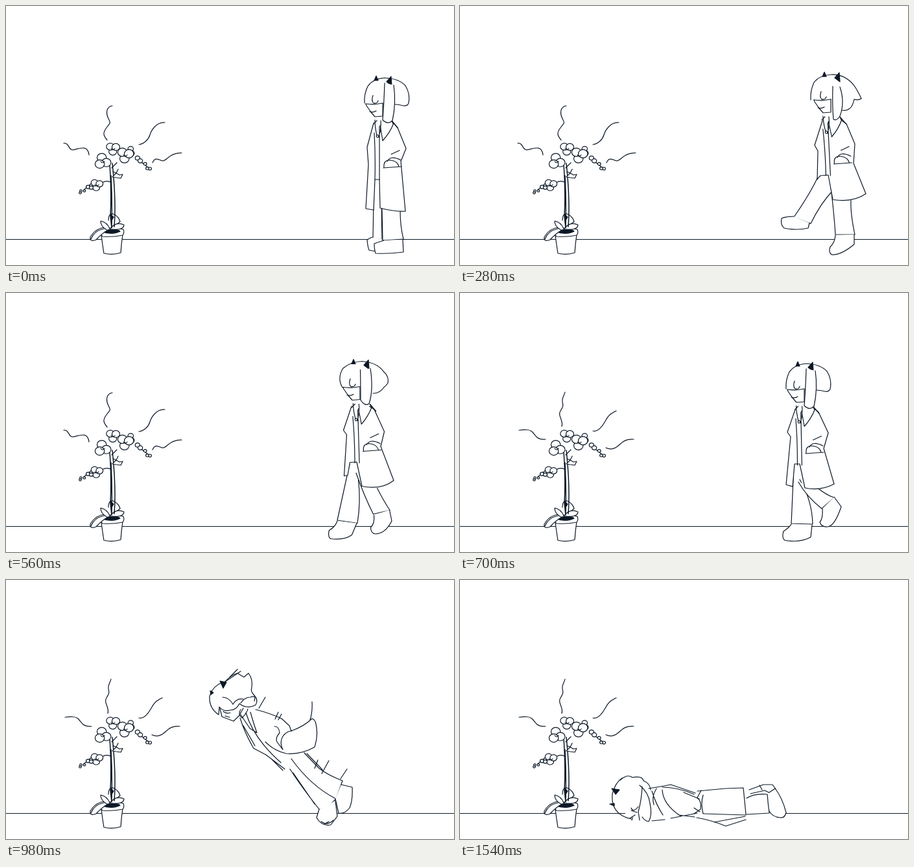
Write an HTML page that moves like this. It is 691 px wide and 400 px high and loops after 1610 ms.

```html
<!DOCTYPE html>
<html lang="en">
<head>
<meta charset="utf-8">
<title>Orchid</title>
<style>
  html, body { margin: 0; width: 100%; height: 100%; overflow: hidden; background: #fff; }
  svg { display: block; width: 691px; height: 400px; }
  path, circle { fill: #fff; stroke: #0c1826; stroke-width: 1.2; stroke-linecap: round; stroke-linejoin: round; }
  .line { fill: none; }
  .ink { fill: #0c1826; }
  .mask { stroke: none; }
</style>
</head>
<body>
<svg viewBox="0 0 691 400">
  <path d="M0 360.5H691" style="stroke-width:1"/>

  <g id="plant">
    <path d="M147 354Q149 370 151 382Q165 385 177 381Q178 366 180 353"/>
    <path d="M145 347Q146 354 149 356Q166 357 180 354Q183 350 181 345Q163 340 145 347"/>
    <path class="ink" d="M149 349Q154 345 164 345Q174 345 176 348Q164 354 149 349"/>
    <path d="M158 331Q158 320 165 321Q174 325 176 333L165 342"/>
    <path d="M153 342Q138 343 130 357Q129 365 139 361Q147 352 157 346"/>
    <path d="M131 360Q136 347 151 344" class="line"/>
    <path d="M160 344Q156 334 146 332Q146 341 156 346"/>
    <path d="M160 345Q169 332 182 338Q182 344 172 345Z"/>
    <path class="line" d="M160 246Q163 285 161 325L163 343M162 262Q164 300 163 342M164 243Q170 300 167 341" style="stroke-width:1.5"/>
    <path class="ink" d="M161 322L166 326L163 331Z"/>
    <path d="M164 264L170 258L175 261L180 260L177 266L170 265Z"/>
    <path class="line" d="M165 256L170 258L173 252M161 272Q155 269 148 273M163 250L170 243M167 246L171 242M120 284L133 273M205 238L220 250"/>
    <g id="blooms"></g>
  </g>

  <g id="scent"></g>

  <g id="walk">
    <g id="legs"></g>
    <g id="upper">
      <path id="coat"/>
      <g id="trim">
        <path class="line" d="M576 186L576 268M568 196Q570 230 569 268M569 176Q569 187 572 200M578 177Q579 190 575 203"/>
        <path class="line" d="M598 181Q592 196 581 208L577 184M567 182L572 177M597 182L595 177L604 188"/>
        <circle cx="573" cy="201" r="1.8"/>
        <path class="line" d="M594 229L607 223M582 250L610 248M583 249Q582 238 592 238Q604 239 606 248M588 240Q593 230 609 238"/>
      </g>
      <g id="head">
        <path id="hair"/>
        <g id="face">
          <path d="M555 151L556 154L563 164L569 171L581 170V150"/>
          <path class="line" d="M555 151Q568 153 581 150M566 138Q563 147 567 150Q573 151 574 146M561 163Q566 165 571 162"/>
          <path class="ink" d="M568 115L571 108L574 115ZM587 117L594 109L595 123Z"/>
        </g>
        <path id="lock"/>
      </g>
    </g>
  </g>

  <g id="fall">
    <path class="mask" d="M438 290L483 354L509 338L519 310L460 267Z"/>
    <path class="line" d="M438 292Q456 320 483 354Q497 352 509 338L519 310Q498 302 483 291L460 267M440 276Q470 318 509 338M443 298L476 346M464 268L488 293"/>
    <path d="M517 316L534 320Q535 340 530 352Q522 362 513 360L508 338"/>
    <path d="M483 354L479 367Q487 381 501 378L511 365L508 341"/>
    <path class="line" d="M486 373Q495 380 505 371M491 377L498 373"/>
    <path d="M385 200Q408 206 425 214L437 225L440 233Q460 226 472 214Q477 216 478 222Q482 240 476 258Q455 270 432 268Q414 264 400 250"/>
    <path class="line" d="M361 213Q368 236 382 260L401 270L430 292M366 225L384 256M370 205Q382 245 424 282M377 204Q382 222 387 236L376 229L362 208M414 226Q421 226 422 236Q415 244 418 250L427 262M427 262Q421 250 428 240Q434 233 441 233M410 277L427 294"/>
    <path d="M329 194L333 211L351 218L360 209L366 198"/>
    <path d="M328 208Q313 198 314 180Q319 162 338 157Q348 146 357 144L367 150L374 144Q381 153 379 166Q377 172 382 177Q390 185 385 193Q372 200 360 191Q355 201 346 201Q335 204 329 196Z"/>
    <path class="line" d="M334 181Q344 181 350 192Q356 182 366 184M362 190Q368 181 377 181Q386 177 383 187M338 210L345 212M335 203Q340 207 346 205M362 200Q357 207 364 213Q372 205 373 199"/>
    <path class="ink" d="M330 156L340 158L335 167ZM315 171L320 174L316 177Z"/>
    <path class="line" d="M345 150L357 138M338 157L362 141M390 198L400 181M415 215L420 204M420 216L425 207M472 188Q473 203 469 216M476 291L481 278M487 299L498 279M516 307L526 292"/>
  </g>

  <g id="lie">
    <path class="mask" d="M234 335L262 303L320 318L366 325L438 321L486 321L503 360L490 367L441 370L410 379L365 368L262 369Z"/>
    <path class="line" d="M250 306Q240 312 235 330Q232 362 264 369M247 309Q258 299 266 305Q281 302 283 310Q293 314 294 324"/>
    <path class="line" d="M281 319Q280 340 275 358L277 371M277 317Q291 328 293 345Q297 363 291 373Q286 373 281 366M264 352Q267 360 275 350M264 356L273 359M262 368L270 363M265 371L266 367"/>
    <path class="ink" d="M234 322L246 324L240 331ZM231 346L238 345L238 349Z"/>
    <path class="line" d="M291 322L315 318L325 316L363 329M312 320Q336 320 361 331M345 328L369 338M296 326Q302 346 313 363M303 322Q295 335 299 347M312 324Q313 347 341 365M296 372L316 370M325 368L366 360M338 363L362 366"/>
    <path class="line" d="M372 325L366 336Q373 342 371 354L361 361M366 326L410 322L437 321L441 362M376 361L441 363M375 332Q371 345 375 361M361 352L370 358M365 367Q388 371 410 380L441 370M392 374L440 365"/>
    <path class="line" d="M442 337Q455 329 474 331Q475 345 477 360L442 362M446 324L468 316L482 316L487 323M448 330L470 325L478 329M462 317L466 324"/>
    <path d="M477 328L486 322Q497 336 503 359Q501 368 494 367Q482 366 477 357"/>
  </g>
</svg>
<script>
const STEP = 70, LOOP = 1610;
const $ = id => document.getElementById(id);
const mix = (a, b, u) => {
  const to = b.match(/-?[\d.]+/g);
  let i = 0;
  return a.replace(/-?[\d.]+/g, n => (+n + (to[i++] - n) * u).toFixed(2));
};
const addPath = (parent, attrs) => {
  const p = document.createElementNS("http://www.w3.org/2000/svg", "path");
  for (const k in attrs) p.setAttribute(k, attrs[k]);
  return $(parent).appendChild(p);
};

// Blossoms: big petals overlapping around a centre
function bloom(x, y, r, petals) {
  const c = r * .6;
  const disc = (a, b) => `M${a - c} ${b}a${c} ${c * .9} 0 1 1 ${2 * c} 0a${c} ${c * .9} 0 1 1 ${-2 * c} 0`;
  for (let i = 0; i < petals; i++) {
    const a = i * 2 * Math.PI / petals + x;
    addPath("blooms", { d: disc(x + Math.cos(a) * r * .5, y + Math.sin(a) * r * .5) });
  }
  if (r > 6) addPath("blooms", { class: "line", d: `M${x - 3} ${y}q3 4 6 0` });
}
[[193, 224, 7, 2], [165, 220, 10, 3], [184, 230, 12, 3], [149, 240, 12, 3], [205, 237, 6, 2],
 [140, 276, 9, 3], [129, 280, 5, 2], [115, 287, 3, 2], [121, 284, 3, 1], [213, 245, 4, 1], [220, 251, 4, 2]]
  .forEach(b => bloom(...b));

const scent = [
  ["M164 154C154 156 154 166 158 174S161 180 155 188S150 200 156 207", "M162 153C161 158 157 162 158 168S160 174 155 182S160 196 157 206"],
  ["M205 214C213 213 220 206 222 199S232 179 245 180", "M205 213C213 215 219 207 224 198S231 187 241 182"],
  ["M226 242C230 233 235 237 241 239S252 226 271 227", "M225 239C231 242 238 241 244 236S254 225 268 226"],
  ["M89 212C97 211 96 221 102 222S126 211 128 230", "M91 212C99 211 107 210 112 215S118 227 132 226"]
].map(pair => ({ pair, el: addPath("scent", { class: "line" }) }));

// Walk poses: standing, leg raised, stride, passing
const KEYS = [0, 4, 6, 10];
const parts = [
  [addPath("legs", {}), "d", [
    "M567 268Q567 310 566 358L580 361Q579 310 579 268",
    "M553 262Q540 290 515 326L541 336Q556 305 575 285",
    "M545 264Q528 305 511 346L540 354Q552 323 563 290",
    "M515 264Q513 310 511 356L544 357Q543 320 524 288"]],
  [addPath("legs", {}), "d", [
    "M566 357Q560 358 557 362Q558 372 560 377Q570 380 582 378L582 361",
    "M515 325Q503 325 496 328Q494 338 500 343Q520 347 537 343L539 335",
    "M511 347Q508 360 498 365Q496 374 500 377Q520 378 526 370L539 353",
    "M511 357Q508 362 499 368Q496 378 501 382Q525 386 541 377L543 358"]],
  [addPath("legs", {}), "d", [
    "M579 270Q580 315 581 362L613 360Q608 340 608 316",
    "M570 262Q577 320 579 353L609 353Q602 320 603 300",
    "M558 264Q569 310 575 350L607 355Q600 330 595 303",
    "M522 292Q535 315 558 333L577 316Q565 312 550 300"]],
  [addPath("legs", {}), "d", [
    "M583 362Q576 364 568 367Q568 376 570 382Q590 383 613 380L612 361",
    "M579 354Q578 366 571 372Q568 380 573 384Q588 385 608 368L608 353",
    "M576 353Q578 364 570 370Q567 380 572 383Q592 384 602 374L606 355",
    "M559 333Q560 348 555 354Q558 362 567 361Q578 360 588 330L577 315"]],
  [$("coat"), "d", [
    "M567 181L557 218L559 245L555 313L567 315L569 268L576 268L577 312Q600 318 616 317L609 240L617 220L604 188L597 180",
    "M559 177L547 215L552 224L551 268L553 265L556 262L568 261L575 299Q605 304 626 290L607 243L609 213L596 182L589 177",
    "M549 176L536 215L541 222L540 275L541 270L545 265L558 264L566 302Q602 309 619 290L595 240L599 218L583 182L575 178",
    "M517 180L505 215L510 222L503 296L513 299L516 264L524 264L532 301Q556 306 577 295L561 240L568 216L553 184L546 178"]],
  [$("hair"), "d", [
    "M553 150Q552 136 558 124Q566 112 584 111Q606 112 616 123Q624 136 621 150Q619 155 613 154Q606 152 600 152",
    "M553 151Q552 137 558 124Q566 113 584 112Q608 111 622 132Q628 142 631 149Q626 152 620 150Q616 170 601 167",
    "M562 153Q546 140 558 120Q574 111 592 111Q616 114 625 130Q635 132 634 139Q630 143 630 148Q625 169 609 169",
    "M553 150Q552 136 558 124Q566 112 584 111Q606 112 616 123Q624 136 621 150Q619 155 613 154Q606 152 600 152"]],
  [$("lock"), "d", [
    "M584 119Q583 150 581 176Q589 184 596 177Q602 150 598 122",
    "M587 130Q586 160 588 181Q593 184 598 176Q606 155 598 131",
    "M586 129Q588 150 590 166Q595 178 601 176Q609 160 603 122",
    "M584 119Q583 150 581 176Q589 184 596 177Q602 150 598 122"]],
  [$("face"), "transform", [
    "translate(0 0)", "translate(3 0)", "translate(7 0)", "translate(0 0)"]],
  [$("trim"), "transform", [
    "matrix(1 0 0 1 0 0)", "matrix(1 0 .05 1 -18 -6)", "matrix(1 0 .03 1 -24 -3)", "matrix(1 0 .02 1 -54 -2)"]],
  [$("head"), "transform", [
    "translate(0 0)", "translate(-12 -6)", "translate(-27 -3)", "translate(-50 -2)"]]
];

function drawWalk(n) {
  const at = Math.min(n, 10), i = at < 4 ? 0 : at < 6 ? 1 : 2;
  const u = (at - KEYS[i]) / (KEYS[i + 1] - KEYS[i]);
  for (const [el, attr, poses] of parts) el.setAttribute(attr, mix(poses[i], poses[i + 1], u));
  const bob = i === 1 ? 0 : 3 * Math.sin(Math.PI * u);
  $("upper").setAttribute("transform", `translate(0 ${-bob})`);
  const tip = n - at;
  $("walk").setAttribute("transform", `rotate(${-3 * tip * (tip + 1)} 522 375) translate(${-4 * tip} 0)`);
}

function frame(now) {
  const n = Math.floor(now % LOOP / STEP);
  const show = (id, on) => $(id).style.display = on ? "" : "none";
  show("walk", n < 13);
  show("fall", n > 12 && n < 17);
  show("lie", n > 16);
  if (n < 13) drawWalk(n);
  else $("fall").setAttribute("transform", `rotate(${-17.5 * (n - 14)} 505 365)`);
  for (const { pair, el } of scent) el.setAttribute("d", mix(...pair, [0, .5, 1, .5][n % 4]));
  requestAnimationFrame(frame);
}
frame(performance.now());
</script>
</body>
</html>
```
